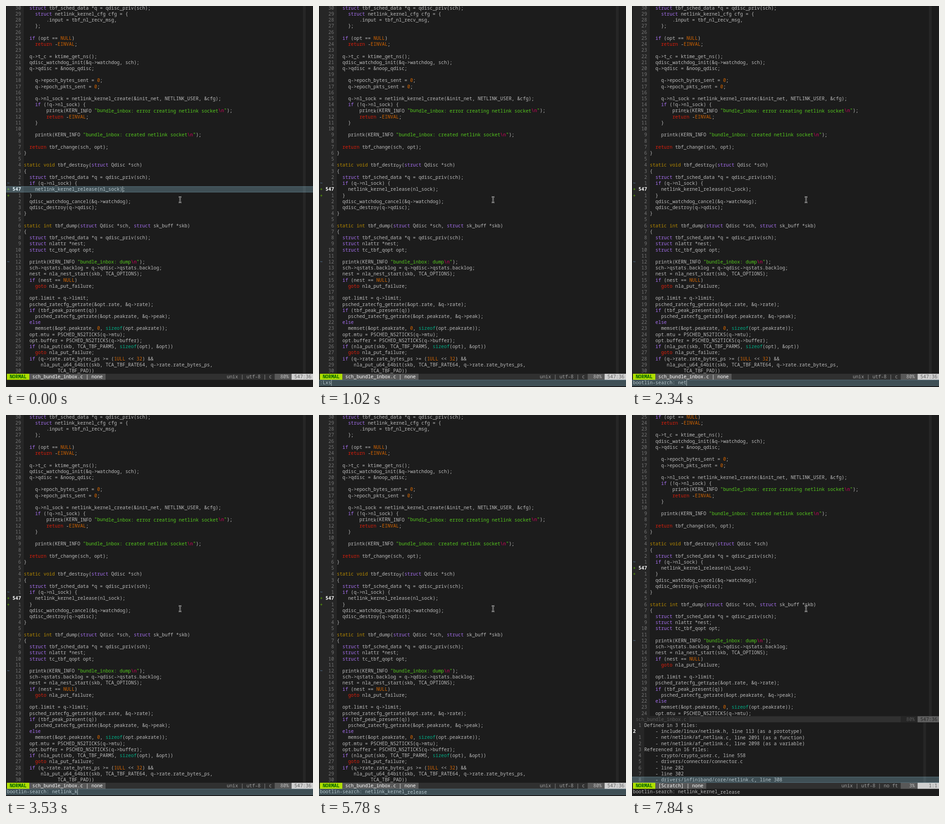
An HTML page with a canvas for the animation above (7990 ms loop, 672x833 px).

```html
<!DOCTYPE html>
<html lang="en">
<head>
<meta charset="utf-8">
<title>Editor session</title>
<style>
html, body { margin: 0; width: 100%; height: 100%; overflow: hidden; background: #1c1c1c; }
canvas { display: block; }
</style>
</head>
<body>
<canvas id="stage" width="672" height="833"></canvas>
<script>
const ctx = document.getElementById('stage').getContext('2d');
const LOOP = 7990, COLS = 109, LINE = 30;
const SCALE = 0.8814, CW = 7 * SCALE, CH = 15 * SCALE;
const X = col => 2 + col * CW;
const Y = row => row * CH - 2.4;

const TEXT = '#bcbcbc', BG = '#1c1c1c', GUTTER = '#262626', NUMBER = '#767676';
const SIGNS = { 29: '~', 30: '+', 31: '+', 42: '~' };

const CODE = String.raw`  struct tbf_sched_data *q = qdisc_priv(sch);
    struct netlink_kernel_cfg cfg = {
        .input = tbf_nl_recv_msg,
    };

  if (opt == NULL)
    return -EINVAL;

  q->t_c = ktime_get_ns();
  qdisc_watchdog_init(&q->watchdog, sch);
  q->qdisc = &noop_qdisc;

    q->epoch_bytes_sent = 0;
    q->epoch_pkts_sent = 0;

    q->nl_sock = netlink_kernel_create(&init_net, NETLINK_USER, &cfg);
    if (!q->nl_sock) {
        printk(KERN_INFO "bundle_inbox: error creating netlink socket\n");
        return -EINVAL;
    }

    printk(KERN_INFO "bundle_inbox: created netlink socket\n");

  return tbf_change(sch, opt);
}

static void tbf_destroy(struct Qdisc *sch)
{
  struct tbf_sched_data *q = qdisc_priv(sch);
  if (q->nl_sock) {
    netlink_kernel_release(nl_sock);
  }
  qdisc_watchdog_cancel(&q->watchdog);
  qdisc_destroy(q->qdisc);
}

static int tbf_dump(struct Qdisc *sch, struct sk_buff *skb)
{
  struct tbf_sched_data *q = qdisc_priv(sch);
  struct nlattr *nest;
  struct tc_tbf_qopt opt;

  printk(KERN_INFO "bundle_inbox: dump\n");
  sch->qstats.backlog = q->qdisc->qstats.backlog;
  nest = nla_nest_start(skb, TCA_OPTIONS);
  if (nest == NULL)
    goto nla_put_failure;

  opt.limit = q->limit;
  psched_ratecfg_getrate(&opt.rate, &q->rate);
  if (tbf_peak_present(q))
    psched_ratecfg_getrate(&opt.peakrate, &q->peak);
  else
    memset(&opt.peakrate, 0, sizeof(opt.peakrate));
  opt.mtu = PSCHED_NS2TICKS(q->mtu);
  opt.buffer = PSCHED_NS2TICKS(q->buffer);
  if (nla_put(skb, TCA_TBF_PARMS, sizeof(opt), &opt))
    goto nla_put_failure;
  if (q->rate.rate_bytes_ps >= (1ULL << 32) &&
      nla_put_u64_64bit(skb, TCA_TBF_RATE64, q->rate.rate_bytes_ps,
            TCA_TBF_PAD))`.split('\n');

const RESULTS = `Defined in 3 files:
    - include/linux/netlink.h, line 113 (as a prototype)
    - net/netlink/af_netlink.c, line 2091 (as a function)
    - net/netlink/af_netlink.c, line 2098 (as a variable)
Referenced in 16 files:
    - crypto/crypto_user.c, line 558
    - drivers/connector/connector.c
    - line 282
    - line 302
    - drivers/infiniband/core/netlink.c, line 308`.split('\n');

// Syntax rules, tried in order
const RULES = [
  [/^(struct|if|else)\b/, '#a56fee'],
  [/^(return|goto)\b/, '#dc1e0a'],
  [/^(static|void|int)\b/, '#b58900'],
  [/^sizeof\b/, '#00af87'],
  [/^(NULL|EINVAL|\d\w*)\b/, '#d26400'],
  [/^\\n/, '#d7005f'],
  [/^"[^"\\]*(?=\\)|^"/, '#55c81e'],
  [/^\w+|^./, TEXT]
];

// Time of each key press and the number of characters then shown
const COMMAND = ':Lxs', COMMAND_KEYS = [[120, 1], [540, 2], [780, 3], [1020, 4]];
const SEARCH = 'bootlin-search: netlink_kernel_release';
const SEARCH_KEYS = [
  [1380, 16], [1980, 17], [2340, 19], [2450, 20], [2690, 22], [2810, 23], [3290, 24],
  [3530, 25], [3650, 26], [3770, 27], [3880, 29], [4350, 30], [4590, 31], [4710, 32],
  [4830, 33], [4940, 34], [5060, 35], [5180, 36], [5300, 38]
];
const ENTER = 5780, SPLIT = 7310, MOVE = 7840;

function box(col, row, cols, color, rows = 1) {
  ctx.fillStyle = color;
  ctx.fillRect(X(col), Y(row), cols * CW, rows * CH);
}

function print(text, col, row, color = TEXT, weight = 400) {
  ctx.save();
  // The tiny skew keeps baselines from snapping to whole pixels
  ctx.setTransform(SCALE, 0.0003, 0, SCALE, X(col), Y(row));
  ctx.font = weight + ' 11.667px "Noto Sans Mono", "DejaVu Sans Mono", monospace';
  ctx.fillStyle = color;
  [...text].forEach((ch, i) => { if (ch !== ' ') ctx.fillText(ch, i * 7, 11.5); });
  ctx.restore();
}

function segment(text, col, row, color, bg, weight) {
  box(col, row, text.length, bg);
  print(text, col, row, color, weight);
}

function printCode(line, row) {
  let col = 0;
  while (col < line.length) {
    const rest = line.slice(col);
    const [pattern, color] = RULES.find(rule => rule[0].test(rest));
    const token = rest.match(pattern)[0];
    print(token, col + 6, row, color);
    col += token.length;
  }
}

function codeWindow(first, rows) {
  box(0, 0, 6, GUTTER, rows);
  box(105, 0, 1, GUTTER, rows);
  for (let row = 0; row < rows; row++) {
    const i = row + first, sign = SIGNS[i];
    if (sign) print(sign, 0, row, sign === '+' ? '#5faf00' : '#5f87af');
    if (i === LINE) print('547', 2, row, '#ffffff', 700);
    else print(String(Math.abs(i - LINE)).padStart(3), 2, row, NUMBER);
    printCode(CODE[i], row);
  }
}

function resultWindow(current) {
  box(0, 51, 4, GUTTER, 10);
  box(103, 51, 1, GUTTER, 10);
  RESULTS.forEach((line, i) => {
    const row = 51 + i;
    if (i === current) print(String(i + 1), 0, row, '#ffffff', 700);
    else print(String(Math.abs(i - current)).padStart(3), 0, row, NUMBER);
    print(line, 4, row);
  });
}

function statusLine(name, info, percent, place) {
  box(0, 61, COLS, '#303030');
  segment(' NORMAL ', 0, 61, '#005f00', '#afdf00', 700);
  segment(` ${name} | none `, 8, 61, '#ffffff', '#585858');
  print(info, 94 - info.length, 61, '#9e9e9e');
  segment(percent, 95, 61, '#bcbcbc', '#585858');
  segment(place, 101, 61, '#606060', '#d0d0d0');
}

function idleStatusLine() {
  box(0, 50, COLS, '#303030');
  segment(' sch_bundle_inbox.c ', 0, 50, '#585858', '#262626');
  segment('  80% ', 95, 50, '#585858', '#262626');
  segment(' 547:36 ', 101, 50, '#262626', '#606060');
}

function guide(row) {
  ctx.fillStyle = 'rgba(166,232,255,.25)';
  ctx.fillRect(0, Y(row), 672, CH);
  ctx.fillRect(0, Y(row), 672, SCALE);
  ctx.fillRect(0, Y(row + 1) - SCALE, 672, SCALE);
}

function caret(col, row) {
  ctx.fillStyle = '#c4d0d2';
  ctx.fillRect(X(col), Y(row), SCALE, CH);
}

function mouse() {
  const beam = new Path2D('M378 417.5Q381 417.5 381 420V427Q381 429.5 378 429.5M384 417.5Q381 417.5 381 420M381 427Q381 429.5 384 429.5M379.5 424.5H382.5');
  ctx.strokeStyle = '#e8e8e8';
  ctx.lineWidth = 2.4;
  ctx.stroke(beam);
  ctx.strokeStyle = '#101010';
  ctx.lineWidth = 1;
  ctx.stroke(beam);
}

const typed = (keys, t) => keys.reduce((n, [at, count]) => t >= at ? count : n, 0);

function draw(t) {
  ctx.fillStyle = BG;
  ctx.fillRect(0, 0, 672, 833);
  const split = t >= SPLIT, searching = t >= SEARCH_KEYS[0][0];
  const count = typed(searching ? SEARCH_KEYS : COMMAND_KEYS, t);
  print((searching ? SEARCH : COMMAND).slice(0, count), 0, 62);

  if (split) {
    codeWindow(5, 50);
    idleStatusLine();
    resultWindow(t < MOVE ? 0 : 1);
    statusLine('[Scratch]', 'unix | utf-8 | no ft', '   3% ', '    1:1 ');
    guide(t < MOVE ? 51 : 60);
    if (t < MOVE) caret(4, 51);
  } else {
    codeWindow(0, 61);
    statusLine('sch_bundle_inbox.c', 'unix | utf-8 | c', '  80% ', ' 547:36 ');
    const [col, row] = count ? [count, 62] : [41, LINE];
    guide(row);
    if (t < ENTER) caret(col, row);
  }
  mouse();
}

const start = performance.now();
function tick() {
  draw((performance.now() - start) % LOOP);
  requestAnimationFrame(tick);
}
draw(0);
requestAnimationFrame(tick);
</script>
</body>
</html>
```
